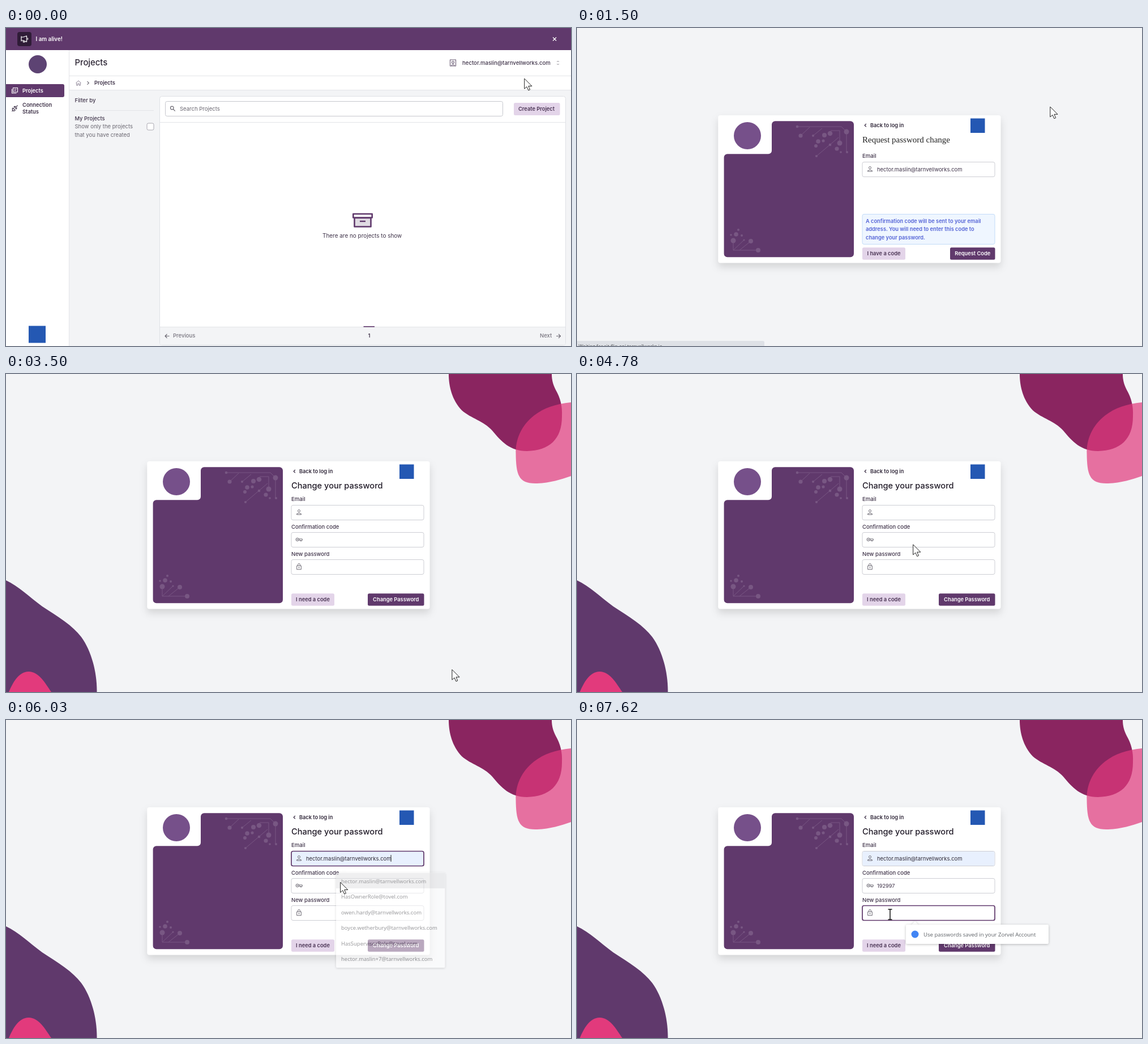
Write an HTML page that moves like this. It is 998 by 561 pixels and loops after 8 s.

```html
<!DOCTYPE html>
<html lang="en">
<head>
<meta charset="utf-8">
<title>Password change</title>
<style>
html, body { margin: 0; width: 100%; height: 100%; overflow: hidden; background: #f3f4f6; }
svg { display: block; width: 998px; height: 561px; }
text { font-family: Inter, "Noto Sans", sans-serif; }
.sys { font-family: "Open Sans", "Noto Sans", sans-serif; }
.serif { font-family: "Liberation Serif", serif; }
.soft { filter: drop-shadow(0 1px 2px rgba(0, 0, 0, .25)); }
.deep { filter: drop-shadow(0 7px 7px rgba(0, 0, 0, .13)); }
</style>
</head>
<body>
<svg id="stage" viewBox="0 0 998 561" xmlns="http://www.w3.org/2000/svg"></svg>
<script>
const LOOP = 8000;
const PURPLE = '#60396c', INK = '#3f3349', GREY = '#6b6872', LINE = '#e3e4e8', LILAC = '#e3d4e9', BLUE = '#2458b3';
const MAIL = 'hector.maslin@tarnvellworks.com';
const MAILS = [MAIL, 'HasOwnerRole@tovel.com', 'owen.hardy@tarnvellworks.com',
  'boyce.wetherbury@tarnvellworks.com', 'HasSupervisorRole@tovel.com', 'hector.maslin+7@tarnvellworks.com'];

const text = (x, y, s, size = 9.5, fill = INK, weight = 500, more = '') =>
  `<text x="${x}" y="${y}" font-size="${size}" fill="${fill}" font-weight="${weight}" ${more}>${s}</text>`;
const rect = (x, y, w, h, fill, r = 0, more = '') =>
  `<rect x="${x}" y="${y}" width="${w}" height="${h}" rx="${r}" fill="${fill}" ${more}/>`;
const path = (d, stroke, width = 1, fill = 'none', more = '') =>
  `<path d="${d}" stroke="${stroke}" stroke-width="${width}" fill="${fill}" stroke-linejoin="round" ${more}/>`;
const dot = (x, y, r, fill) => `<circle cx="${x}" cy="${y}" r="${r}" fill="${fill}"/>`;
const group = (id, body, more = '') => `<g id="${id}" ${more}>${body}</g>`;
const border = (c, w = 1) => `stroke="${c}" stroke-width="${w}"`;
const heading = s => text(504, 202, s, 14.6, '#221c29', 500);

function button(x, w, label, fill, ink) {
  return rect(x, 387.3, w, 21.5, fill, 2.5) +
    text(x + w / 2, 401.4, label, 9.3, ink, 600, 'text-anchor="middle"');
}

function field(y, icon) {
  return rect(504, y + .5, 234, 26, '#fff', 3, border('#cdced4')) + icon(517.5, y + 13);
}

const focusRing = (id, y) => group(id, rect(504, y + .5, 234, 26, 'none', 3, border(PURPLE, 1.7)));

const userIcon = (x, y) =>
  path(`M${x - 2} ${y - 2.5}a2 2 0 1 0 4 0a2 2 0 1 0 -4 0M${x - 4} ${y + 4}v-1.2q4 -3 8 0v1.2z`, GREY);
const keyIcon = (x, y) =>
  path(`M${x - 5.5} ${y}a2.7 2.7 0 1 0 5.4 0a2.7 2.7 0 1 0 -5.4 0M${x - .5} ${y - 1}h6.3v2l-1.5 2l-1 -2l-1 2l-1 -2h-2`, GREY) +
  dot(x - 2.8, y, 1, GREY);
const lockIcon = (x, y) =>
  path(`M${x - 3.8} ${y - 1.8}h7.6v6.6h-7.6zM${x - 2} ${y - 2}v-1.4a2 2 0 0 1 4 0v1.4`, GREY) + dot(x, y + 1.5, 1, GREY);

function projects() {
  const menuRow = (y, s, d) => path(d, GREY) + text(854, y, s, 9.35, '#5d5866', 600);
  return rect(0, 0, 998, 561, '#f3f4f6') +
    rect(0, 39, 111, 522, '#fff') + rect(111, 39, 887, 70, '#fff') +
    path('M111.5 39V561M111 84.5H998M111 109.5H998', LINE) +
    rect(0, 0, 998, 39, PURPLE) + rect(20, 7, 25, 25, '#2f1c37', 4) +
    path('M27 14.5v9M27 16h3.5l6 -2v10.5l-6 -2.5H27M30.5 22.5v2.5h2.5v-2M38 17.5q1.5 1.7 0 3.4', '#fff', 1.2) +
    text(52.5, 22.7, 'I am alive!', 9.8, '#fff', 600) +
    path('M966 16.5l6 6M972 16.5l-6 6', '#fff', 1.3) +
    dot(56, 64, 16, '#5d4373') +
    path('M0 99H100a3 3 0 0 1 3 3V119a3 3 0 0 1 -3 3H0z', 'none', 0, PURPLE) +
    path('M12.5 105.5h8v7.5h-8zM10.5 107.5v7.5h8M14.5 108h4M14.5 110.5h3', '#fff', 1.1) +
    text(29, 113.6, 'Projects', 9.3, '#fff', 600) +
    path('M10.5 147l2.2 -2.2M12.3 141l4 4q-2.2 2.6 -4.2 .4t.2 -4.4M14.5 139l4 4M15.5 138l-1.5 1.5q2 -2.2 4 -.2t-.2 4M18.5 138.5l2 -2', INK, 1.1) +
    text(29, 139.4, 'Connection', 9.35, INK, 600) + text(29, 151, 'Status', 9.35, INK, 600) +
    rect(40, 525.5, 30, 30, BLUE) +
    text(121.5, 66.4, 'Projects', 14.8, '#2b2433') +
    path('M123.5 97l4.5 -4l4.5 4M124.7 96.5v4.7h2.1v-3h2.4v3h2.1v-4.7', '#8d8496', 1) +
    path('M143.5 94.2l2.8 2.8l-2.8 2.8', GREY, 1.1) + text(156, 100, 'Projects', 9.3, INK, 600) +
    path('M784.5 56h10v11h-10zM786.5 66.5q3 -4 6 0M787.5 60.5a2 2 0 1 0 4 0a2 2 0 1 0 -4 0', '#685a73', 1.1) +
    text(806, 64.7, MAIL, 9.6) +
    path('M973.3 60l1.7 -1.8l1.7 1.8M973.3 63l1.7 1.8l1.7 -1.8', GREY, .8) +
    text(121.5, 130.8, 'Filter by', 9.6, INK) + path('M122 145.5H261', LINE) +
    text(121.5, 162.7, 'My Projects', 9.4, INK, 500) +
    text(121.5, 177, 'Show only the projects', 9.5, GREY, 400) +
    text(121.5, 191.6, 'that you have created', 9.5, GREY, 400) +
    rect(249, 168, 12, 12, '#fff', 2.5, border('#a9a7b0')) +
    rect(271.5, 120.5, 717, 439, '#fff', 4, border('#dfe1e5')) +
    path('M272 527H988V556a3 3 0 0 1 -3 3H275a-3 3 0 0 1 -3 -3z', 'none', 0, '#f3f4f6') +
    path('M272 166.5H988M272 527.5H988', LINE) + rect(631.5, 526, 19.5, 1.6, PURPLE) +
    rect(281.5, 129.5, 596, 26, '#fff', 3, border('#c6c7cd')) +
    path('M290.5 141a2.8 2.8 0 1 0 5.6 0a2.8 2.8 0 1 0 -5.6 0M295.3 143l3.4 3.6', GREY, 1.2) +
    text(307, 146.4, 'Search Projects', 9.5, GREY, 400) +
    rect(897, 132, 81.5, 22, LILAC, 2.5) + text(905, 145.9, 'Create Project', 9.3, '#493353', 600) +
    path('M615.5 335H644.5V350.5H615.5z', PURPLE, 2.6, '#e0dbe3') +
    path('M613.3 328H646.7V334.5H613.3z', PURPLE, 2.6, '#fff') + path('M625 341H635', PURPLE, 2.4) +
    text(559, 370, 'There are no projects to show', 9.95, INK, 400) +
    path('M288.5 543.5h-7M284.5 540l-3.5 3.5l3.5 3.5M972 543.5h7.5M976 540l3.5 3.5l-3.5 3.5', GREY, 1.1) +
    text(295, 546.3, 'Previous', 9.5, '#77747e') + text(943, 546.3, 'Next', 9.5, '#77747e') +
    text(639.5, 546.3, '1', 9.5, INK, 600) +
    group('menu',
      rect(771.2, 47, 218, 29.3, 'none', 3, border(PURPLE, 1.7)) +
      rect(824, 80, 160, 105.5, '#fff', 3, 'class="soft"') + rect(824, 80, 160, 30, '#f9f9fb', 3) +
      path('M824 110.5H984M824 140.5H984M824 170.5H984', '#f0f0f3') +
      menuRow(98.4, 'Dark Mode', 'M839 91.5a4.5 4.5 0 1 0 6.5 5.5q-6 0 -6.5 -5.5M843.5 90v4M841.5 92h4') +
      menuRow(128.6, 'Change Password', 'M836 123h9v8h-9zM838 123v-2h5v2M839 123v8M842 123v8M836 127h9') +
      menuRow(158.4, 'Sign Out', 'M842 153v-2.5h-6v10h6v-2.5M839 155.5h6M843 153.5l2 2l-2 2') +
      text(908, 180.2, '2022.10.11-sit-103', 7.8, GREY, 400));
}

function circuits() {
  const lines = 'M389 174H467L476 183V219M395 190L411 175M417 190L433 177M423 226L462 193M464 203V181H448' +
    'M276 375V392H320M276 392L295 374M287 392L307 376';
  const dots = [[389, 174, 2.3], [395, 190, 3.6], [417, 190, 2], [426, 200, 3.8], [437, 189, 4], [447, 186, 4.3],
    [476, 183, 4.5], [464, 203, 4.5], [435, 199, 2.6], [422, 208, 3], [459, 213, 3.6], [447, 206, 2.3],
    [466, 219, 1.8], [477, 219, 2], [423, 226, 2.1], [276, 375, 4.5], [281, 364, 3.8], [285, 356, 2],
    [272, 365, 1.8], [291, 366, 2], [307, 376, 4], [320, 392, 4], [295, 374, 1.6]];
  return `<g opacity=".75">${path(lines, '#80618b')}${dots.map(d => dot(...d, '#80618b')).join('')}</g>`;
}

function blobs() {
  const shape = (d, fill, op = 1) => path(d, 'none', 0, fill, `opacity="${op}"`);
  return group('blobs',
    shape('M782 0C782 22 788 46 805 64C822 79 843 82 859 100C875 119 890 136 920 136C960 135 982 115 982 75C983 56 979 42 971 28C966 18 964 10 964 0z', '#8a2560') +
    shape('M998 50C970 53 950 60 933 73C910 91 900 115 900.5 140C901 178 905 194 938 193C962 192 980 186 998 180z', '#e23a7c', .7) +
    shape('M0 364C22 374 42 394 64 410C92 428 118 444 133 464C150 487 161 525 160.5 561H0z', PURPLE) +
    shape('M5 561C12 545 22 525 40 525C58 525 69 545 80 561z', '#e23a7c'));
}

function account() {
  const row = (s, i) => text(592, 287.5 + i * 27.5, s, 9.5, '#45454a', 400, 'class="sys"');
  return rect(0, 0, 998, 561, '#f3f4f6') + blobs() +
    rect(249.3, 154, 499.2, 260.5, '#fff', 4, 'class="deep"') +
    path('M350 164.2H483a6 6 0 0 1 6 6V398.2a6 6 0 0 1 -6 6H265.6a6 6 0 0 1 -6 -6V228.2a6 6 0 0 1 6 -6H338a6 6 0 0 0 6 -6V170.2a6 6 0 0 1 6 -6z', 'none', 0, PURPLE) +
    circuits() + dot(301, 190, 24, '#76508a') +
    path('M510.8 169l-2.6 2.7l2.6 2.7', INK, 1.3) +
    text(518, 174.7, 'Back to log in', 9.2, '#2f2638', 600) +
    rect(695, 159.5, 25.5, 25.5, BLUE) +
    group('request',
      group('plainTitle', text(504, 202, 'Request password change', 15, '#222', 400, 'class="serif"')) +
      group('title', heading('Request password change')) +
      text(504, 229, 'Email', 9.6) + field(236, userIcon) + text(530, 252.5, MAIL, 9.45, INK, 400) +
      rect(504, 328.5, 234, 53, '#eff6ff', 3, border('#c3dcf8')) +
      ['A confirmation code will be sent to your email', 'address. You will need to enter this code to', 'change your password.']
        .map((s, i) => text(510, 343.7 + i * 14.4, s, 9.25, '#5262d6', 600)).join('') +
      button(504, 76, 'I have a code', LILAC, '#493353') + button(659, 79.5, 'Request Code', PURPLE, '#fff')) +
    group('change',
      heading('Change your password') +
      text(504, 224.4, 'Email', 9.6) + field(231, userIcon) +
      group('filled', rect(504.5, 232, 233, 25, '#e8f0fe', 2.5) + userIcon(517.5, 244) +
        text(530, 247.6, MAIL, 9.45, '#2f2a36', 400, 'id="mail"')) +
      text(504, 272.7, 'Confirmation code', 9.5) + field(279, keyIcon) +
      group('code', text(530, 295.8, '192997', 9.2, INK, 400)) +
      text(504, 321, 'New password', 9.5) + field(327, lockIcon) +
      button(504, 76, 'I need a code', LILAC, '#493353') + button(639, 99.5, 'Change Password', PURPLE, '#fff') +
      focusRing('ring1', 231) + focusRing('ring2', 279) + focusRing('ring3', 327) +
      '<rect id="caret" width="1" height="12" fill="#222"/>' +
      group('list',
        path('M590 270l7 -7l7 7z', 'none', 0, '#fff') + rect(583, 269.5, 192.5, 167.5, '#fff', 2, 'class="soft"') +
        group('hover', rect(583, 270, 192.5, 27, '#e4e4e6')) + MAILS.map(row).join('')) +
      group('saved',
        path('M590 362l7 -7l7 7z', 'none', 0, '#fff', 'class="soft"') + rect(581, 361, 252, 34, '#fff', 2, 'class="soft"') +
        dot(597, 378, 6.5, '#4285f4') +
        text(612, 381.7, 'Use passwords saved in your Zorvel Account', 9.6, '#5f6368', 400, 'class="sys"'))) +
    group('status', path('M0 552H328a3 3 0 0 1 3 3V561H0z', 'none', 0, '#dee1e6') +
      text(3, 565, 'Waiting for sit-flip-api.tarnvellworks.io...', 8.4, '#4a4d52', 400, 'class="sys"'));
}

const cursors =
  group('arrow', path('M.7 .2V18.2L4.9 14.6L7.8 21L10.6 19.8L7.8 13.5H13.9z', '#222', 1, '#fff')) +
  group('hand', path('M-2 1.5C-2 -.7 2 -.7 2 1.5V8C2 6.5 5.5 6.5 5.5 9C5.5 7.7 8.5 7.7 8.5 10C8.8 8.8 11 9 11 11V16C11 19 9 20 9 23.5H-1C-1 20.5 -5 17 -7 13C-8 11 -5 9.8 -3.5 12L-2 13.5z', '#222', 1.1, '#fff') +
    path('M2 8V12M5.5 9V12.5M8.5 10V13', '#222', .9)) +
  group('beam', path('M-3.5 -9H3.5M0 -9V9M-3.5 9H3.5', '#111', 1.5));

const stage = document.getElementById('stage');
stage.innerHTML = group('home', projects()) + group('account', account()) + cursors;
const el = id => document.getElementById(id);

function show(id, amount) {
  const v = Number(amount);
  el(id).style.display = v > 0 ? '' : 'none';
  el(id).style.opacity = v;
}
const clamp = v => Math.max(0, Math.min(1, v));
const ramp = (t, a, b) => clamp((t - a) / (b - a));

// time, x, y, cursor shape from then on
const track = [
  [0, 915, 89, 'arrow'], [70, 915, 89, 'arrow'], [210, 900, 70, 'hand'], [330, 890, 60, 'hand'],
  [480, 890, 60, 'hand'], [810, 862, 94, 'hand'], [1020, 845, 119, 'hand'], [1120, 840, 130, 'hand'],
  [1290, 836, 138, 'arrow'], [1500, 836, 138, 'arrow'], [1640, 710, 244, 'arrow'], [2200, 703, 387, 'hand'],
  [2460, 711, 398, 'hand'], [2600, 712, 400, 'hand'], [2730, 712, 400, 'hand'], [2940, 713, 413, 'hand'],
  [3080, 713, 413, 'arrow'], [3710, 824, 575, 'arrow'], [4170, 921, 575, 'arrow'], [4430, 800, 300, 'arrow'],
  [4570, 690, 163, 'arrow'], [4780, 593, 301, 'arrow'], [4920, 585, 257, 'beam'], [4990, 581, 247, 'beam'],
  [5400, 581, 247, 'beam'], [5540, 588, 270, 'arrow'], [5750, 590, 286, 'arrow'], [6030, 590, 286, 'arrow'],
  [6130, 582, 290, 'beam'], [6310, 570, 293, 'beam'], [6800, 570, 293, 'beam'], [7060, 553, 343, 'beam'],
  [LOOP, 553, 343, 'beam']
];

function moveCursor(t) {
  const i = track.findIndex(k => k[0] > t);
  const [t0, x0, y0, kind] = track[i - 1], [t1, x1, y1] = track[i];
  const u = (t - t0) / (t1 - t0);
  for (const id of ['arrow', 'hand', 'beam']) show(id, id === kind);
  el(kind).setAttribute('transform', `translate(${x0 + (x1 - x0) * u} ${y0 + (y1 - y0) * u})`);
}

// time of focus, caret top, caret shift (-1: end of the address)
const carets = [[7090, 334, 0], [6800, 286, 33], [6310, 286, 0], [5960, 238, -1], [5130, 238, 0]];

function moveCaret(t) {
  const focus = carets.find(c => t >= c[0]);
  show('caret', focus && (t - focus[0]) % 1060 < 530 ? 1 : 0);
  if (!focus) return;
  const shift = focus[2] < 0 ? el('mail').getComputedTextLength() : focus[2];
  el('caret').setAttribute('x', 529 + shift);
  el('caret').setAttribute('y', focus[1]);
}

function draw(t) {
  const away = t >= 1290, loaded = t >= 1560, second = t >= 3215;
  show('home', !away);
  show('account', away);
  show('menu', ramp(t, 400, 540));
  show('blobs', loaded);
  show('title', loaded);
  show('plainTitle', !loaded);
  show('status', t < 1840);
  show('request', !second);
  show('change', second);
  show('filled', t >= 5600);
  show('code', t >= 6800);
  show('ring1', t >= 5130 && t < 6310);
  show('ring2', t >= 6310 && t < 7090);
  show('ring3', t >= 7090);
  show('list', ramp(t, 5200, 5330) * (1 - ramp(t, 5960, 6121)));
  show('hover', t >= 5600);
  show('saved', ramp(t, 7150, 7340));
  moveCursor(t);
  moveCaret(t);
}

function tick() {
  draw(performance.now() % LOOP);
  requestAnimationFrame(tick);
}
tick();
</script>
</body>
</html>
```
